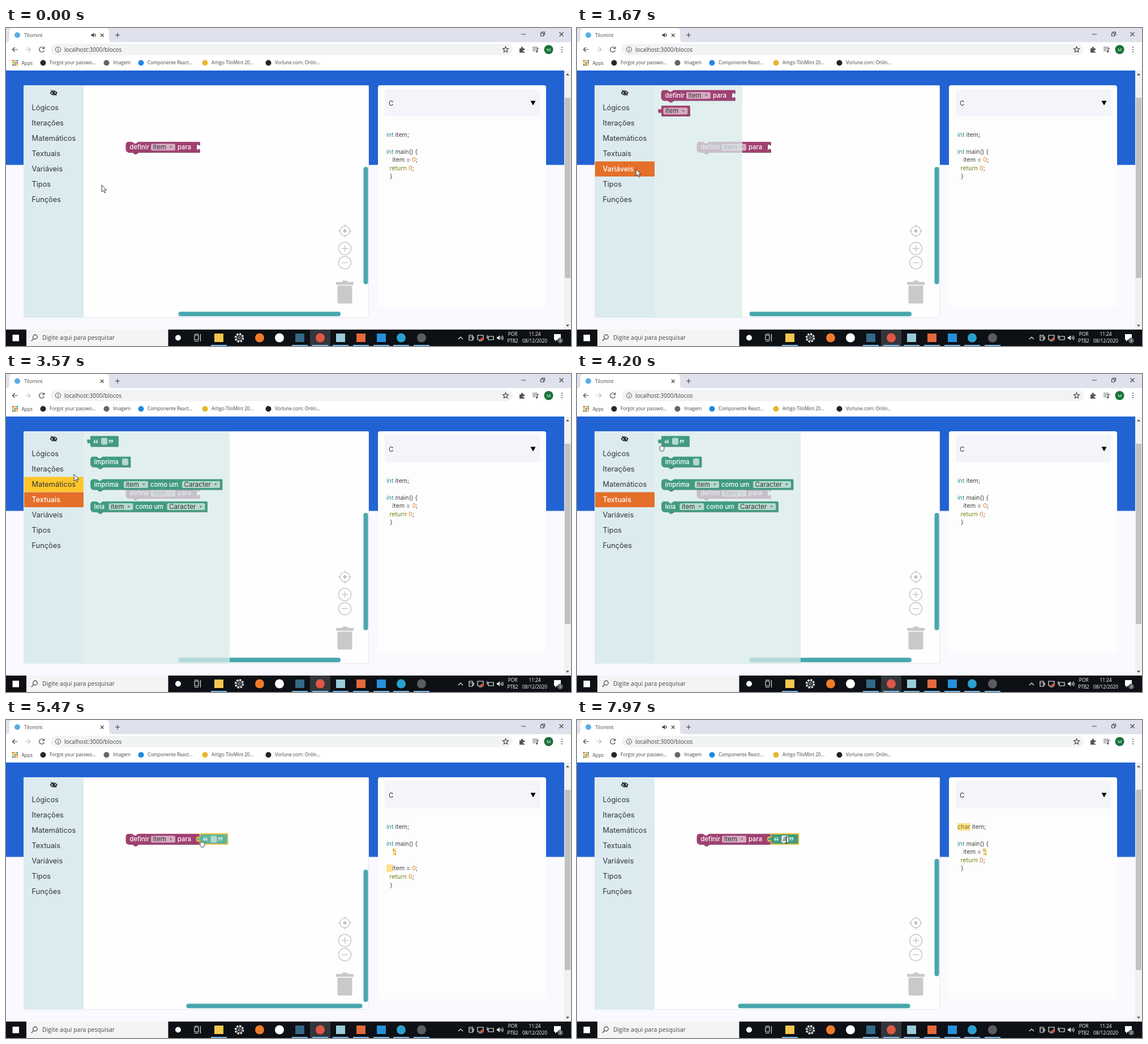
Write an HTML page that moves like this. It is 998 px wide and 561 px high and loops after 8 s.

```html
<!DOCTYPE html>
<html lang="pt-BR">
<head>
<meta charset="utf-8">
<title>Block editor</title>
<style>
html, body { margin: 0; width: 100%; height: 100%; overflow: hidden; background: #f9f9ff; }
svg { display: block; width: 998px; height: 561px; font-family: Inter, sans-serif; }
text { white-space: pre; }
.ui { font-family: "Open Sans", sans-serif; }
.quote { font-family: "Noto Serif", serif; font-weight: 700; }
.line { fill: none; stroke: #444; stroke-width: 1.2; }
</style>
</head>
<body>
<svg id="stage" viewBox="0 0 998 561"></svg>
<script>
const LOOP = 8000;
const PURPLE = '#9f4071', GREEN = '#419b80', TEAL = '#48a7ae', YELLOW = '#ffc62b';

// Markup helpers; text is placed by its vertical centre.
const rect = (x, y, w, h, fill, r = 0, more = '') =>
  `<rect x="${x}" y="${y}" width="${w}" height="${h}" rx="${r}" fill="${fill}" ${more}/>`;
const dot = (x, y, r, fill, more = '') => `<circle cx="${x}" cy="${y}" r="${r}" fill="${fill}" ${more}/>`;
const line = (d, more = '') => `<path class="line" d="${d}" ${more}/>`;
const shape = (d, fill, more = '') => `<path d="${d}" fill="${fill}" ${more}/>`;
const text = (x, y, s, size, fill = '#333', more = '') =>
  `<text x="${x}" y="${y + size * .36}" font-size="${size}" fill="${fill}" ${more}>${s}</text>`;
const ui = (x, y, s, size, fill = '#444', more = '') => text(x, y, s, size, fill, 'class="ui" ' + more);
const group = (id, body, more = '') => `<g id="${id}" ${more}>${body}</g>`;
const at = (x, y, body) => `<g transform="translate(${x} ${y})">${body}</g>`;

// Block parts
const NOTCH = 'l4.4,3 h2.2 l4.4,-3';
const TAB = 'V14.6 c0,-7.3 -5.8,1.8 -5.8,-5.5 s5.8,1.8 5.8,-5.5 Z';
const SOCKET = 'v3.6 c0,7.3 -5.8,-5.8 -5.8,5.5 s5.8,-1.8 5.8,5.5 V18.3';
const body = (d, fill, edge) =>
  shape(d, edge, 'transform="translate(.8 .8)"') + shape(d, fill) +
  `<path d="${d}" fill="none" stroke="#fff" stroke-opacity=".15" stroke-width=".6"/>`;
const statement = (w, fill, edge, socket) =>
  body(`M0,5 a5,5 0 0 1 5,-5 h6 ${NOTCH} H${w} ${socket ? SOCKET : 'V18.3'} H22 l-4.4,3 h-2.2 l-4.4,-3 H5 a5,5 0 0 1 -5,-5 Z`, fill, edge);
const valuePath = w => `M0,0 H${w} V18.3 H0 ${TAB}`;
const label = (x, s) => text(x, 9, s, 11.2, '#fff', 'font-weight="500"');
const field = (x, w, s, fill) => rect(x, 3.4, w, 12, fill, 2.5) + text(x + 3.5, 9, s, 11.6, '#333') +
  shape(`M${x + w - 10},8 h4.6 l-2.3,3 Z`, '#666');
const slot = x => rect(x, 3.4, 11, 12, '#b5d9cd', 3);
const quote = (x, s) => text(x, 13.5, s, 19, '#e9f6f1', 'class="quote"');
const quotes = () => quote(5, '“') + quote(31.5, '”');

const PINK = '#d6abc2', MINT = '#b5d9cd';
const setBlock = statement(130.5, PURPLE, '#762f54', true) +
  label(7, 'definir') + field(44.5, 43, 'item', PINK) + label(91.5, 'para');
const getBlock = body(valuePath(50), PURPLE, '#762f54') + field(3.5, 43, 'item', PINK);
const textBlock = body(valuePath(49), GREEN, '#2f735e') + quotes() + slot(19);
const printBlock = statement(70.5, GREEN, '#2f735e') + label(6.5, 'imprima') + slot(56);
const typedBlock = (verb, x, w) => statement(w, GREEN, '#2f735e') + label(6.5, verb) +
  field(x, 43, 'item', MINT) + label(x + 47, 'como um') + field(x + 103, 67, 'Caracter', MINT);

function browser() {
  const marks = [
    [77, 'Forgot your passwo...', '#24292e'], [189, 'Imagem', '#666'], [250, 'Componente React...', '#1e88e5'],
    [363, 'Artigo TiloMint 20...', '#e8b62c'], [475, 'Vorlune.com: Onlin...', '#222']
  ];
  const colors = ['#db4437', '#f4b400', '#0f9d58'];
  let s = rect(0, 0, 998, 75, '#fff') + rect(0, 0, 998, 25, '#dfe2ec') +
    shape('M0,25 Q6,25 6,19 V6 Q6,0 12,0 H176 Q182,0 182,6 V19 Q182,25 188,25 Z', '#fff') +
    dot(20, 12.5, 5, '#58aee6') + ui(32, 12.5, 'Tilomint', 8.5) +
    group('speaker', shape('M150.5,11 h2 l3,-2.5 v8 l-3,-2.5 h-2 Z', '#444') + line('M157,10 q2,2.5 0,5')) +
    line('M167,10 l5.5,5.5 M172.5,10 l-5.5,5.5') + line('M193,12.5 h8 M197,8.5 v8') +
    line('M910,11 h8 M944.5,9 h5 v5 h-5 Z M946.5,9 v-2 h5 v5 h-2 M977.5,7.5 l7,7 M984.5,7.5 l-7,7', 'stroke-width="1"') +
    line('M20.5,38 h-9 m4,-4 l-4,4 4,4') + line('M34,38 h9 m-4,-4 l4,4 -4,4', 'style="stroke:#bbb"') +
    line('M67,35.5 a4.5,4.5 0 1 0 .5,4 M67.5,33 v3.5 h-3.5') +
    rect(79, 28, 816, 20, '#f1f3f4', 10) + dot(92, 38, 4.6, 'none', 'stroke="#555"') +
    line('M92,37.5 v3 M92,35.2 v1') + ui(103, 38, 'localhost:3000/blocos', 10) +
    line('M882.5,33 l1.4,3.2 3.6,.3 -2.7,2.4 .8,3.6 -3.1,-1.9 -3.1,1.9 .8,-3.6 -2.7,-2.4 3.6,-.3 Z', 'stroke-width="1"') +
    shape('M907,36 h3 q-.5,-3 1.5,-3 t1.5,3 h3 v3 q-3,-.3 -3,1.3 t3,1.3 v2 h-9 Z', '#555') +
    line('M930,34 h9 M930,37 h9 M930,40 h5 M938.5,42 v-6 h3') + dot(937.5, 41.5, 1.7, '#555') +
    dot(958.5, 38, 8, '#187339') + ui(958.5, 38, 'M', 8, '#fff', 'text-anchor="middle"');
  for (let i = 0; i < 3; i++) s += dot(982, 34 + 4 * i, 1.1, '#555');
  for (let i = 0; i < 9; i++) s += rect(11 + 3.7 * (i % 3), 56.5 + 3.7 * (i / 3 | 0), 2.6, 2.6, colors[(i % 3 + (i / 3 | 0)) % 3]);
  s += ui(27.5, 61.5, 'Apps', 8.4);
  for (const [x, name, color] of marks) s += dot(x - 11.5, 61.5, 5, color) + ui(x, 61.5, name, 8.2);
  return s;
}

function page() {
  const rows = ['Lógicos', 'Iterações', 'Matemáticos', 'Textuais', 'Variáveis', 'Tipos', 'Funções'];
  const y = i => 140.5 + 27 * i;
  const controls = dot(598.5, 358, 8.5, 'none') + dot(598.5, 358, 3, '#c4c4c4', 'stroke="none"') +
    dot(598.5, 389, 11, 'none') + dot(598.5, 414, 11, 'none') +
    '<path d="M598.5,346.5 v4 M598.5,365.5 v4 M587,358 h4 M606,358 h4 M593,389 h11 M598.5,383.5 v11 M593,414 h11"/>';
  let s = rect(0, 75, 998, 457, '#f9f9ff') + rect(0, 75, 986, 166.5, '#2163d3') +
    rect(31.5, 101.5, 609, 409, '#fefefe', 1, 'stroke="#e6e6ec"') +
    at(211.5, 200.8, setBlock) +
    `<g stroke="#c8c8c8" stroke-width="1.5">${controls}</g>` +
    shape('M583,448 h10 l2,-2.5 h7 l2,2.5 h10 v5 h-31 Z M585.5,454.5 h26 v29 q0,2.5 -2.5,2.5 h-21 q-2.5,0 -2.5,-2.5 Z', '#c9c9c9') +
    rect(0, 0, 8, 1, TEAL, 4, 'id="vbar"') + rect(0, 500.5, 1, 8, TEAL, 4, 'id="hbar"');
  const flyout = (id, w, blocks) => group(id, rect(137, 101, w, 410, '#d7eaea', 0, 'opacity=".75"') + blocks);
  s += flyout('varFlyout', 155, at(148.5, 109.5, setBlock) + at(149, 137, getBlock)) +
    flyout('textFlyout', 258, at(149, 109.3, textBlock) + at(149, 145.7, printBlock) +
      at(149, 185.5, typedBlock('imprima', 59, 232.5)) + at(149, 224.7, typedBlock('leia', 32.5, 206)));
  s += rect(31.5, 101, 105.5, 410, '#dcebef') +
    line('M78.5,114.5 q5.7,-7 11.5,0 q-5.7,7 -11.5,0 Z M79.5,109.5 l9.5,9.5', 'style="stroke:#222;stroke-width:1.5"') + dot(84.3, 114.5, 2.3, '#222');
  rows.forEach((name, i) => {
    s += rect(32, y(i) - 13, 105, 26.5, YELLOW, 0, `id="hover${i}" opacity="0"`) + text(45.5, y(i), name, 12.8, '#30343a');
  });
  for (const [id, i] of [['varRow', 4], ['textRow', 3]])
    s += group(id, rect(32, y(i) - 13, 105, 26.5, '#e46f29') + text(45.5, y(i), rows[i], 12.6, '#fff', 'font-weight="500"'));
  s += rect(657, 101, 297, 392, '#fdfdfd', 4) + rect(669, 108, 274.5, 47.5, '#f4f4fa', 2) +
    text(676, 132.5, 'C', 11.5) + shape('M926.5,128.5 h9 l-4.5,8 Z', '#000') + code();
  s += rect(986, 75, 12, 457, '#f1f1f1') + rect(987, 123, 10, 318, '#c1c1c1') +
    shape('M989,83.5 l3,-3.5 3,3.5 Z M989,523.5 l3,3.5 3,-3.5 Z', '#505050');
  return s;
}

function code() {
  const span = (s, color) => `<tspan fill="${color}">${s}</tspan>`;
  const row = (n, x, s) => text(x, 188.5 + 14.6 * n, s, 10.7, '#444');
  const mark = (n, x, w) => rect(x, 182 + 14.6 * n, w, 13, '#ffe08c');
  const type = s => span(s, '#2b8995'), zero = span('0', '#df8020');
  const main = row(2, 672, type('int') + ' main() {');
  const end = n => row(n, 677.5, span('return ', '#76801a') + zero + ';') + row(n + 1, 678, '}');
  const decl = row(0, 672, type('int') + ' item;');
  return main +
    group('codeStart', decl + row(3, 682.5, `item = ${zero};`) + end(4)) +
    group('codeDrag', decl + mark(3, 683, 5.5) + row(3, 683, "';") + mark(5, 672, 11) + row(5, 682.5, `item = ${zero};`) + end(6)) +
    group('codeDrop', mark(0, 672, 22.5) + row(0, 672, span('char', '#76701a') + ' item;') +
      mark(3, 717.5, 5.8) + row(3, 682.5, "item = ';") + end(4));
}

function taskbar() {
  // Each app: x, colour, round, open
  const apps = [
    [376, '#f3c64f', 0, 1], [448, '#f07a2b', 1, 0], [483, '#fff', 1, 0], [519, '#346887', 0, 1],
    [555, '#df5746', 1, 1], [591, '#9bcbd8', 0, 1], [627, '#e36a3c', 0, 1], [663, '#2690db', 0, 1],
    [698, '#2aa0cf', 1, 1], [734, '#5b5c62', 1, 1]
  ];
  let s = rect(0, 532, 998, 29, '#0d1015') + rect(11.5, 541, 11.5, 11.5, '#fff') + rect(36, 532, 250.5, 29, '#f4f4f4') +
    dot(51.5, 545, 3.8, 'none', 'stroke="#333" stroke-width="1.2"') + line('M48.8,548 l-4,4') +
    ui(64, 546.5, 'Digite aqui para pesquisar', 10.5) + dot(304, 546.5, 5, '#fff') +
    line('M333,542 h7 v8 h-7 Z M333,540 h7 M333,552.5 h7 M343.5,540 v13', 'style="stroke:#ddd"') +
    dot(412, 546.5, 7, 'none', 'stroke="#eee" stroke-width="2.4" stroke-dasharray="3.5 2"') +
    dot(412, 546.5, 5, 'none', 'stroke="#eee"') + dot(412, 546.5, 2, 'none', 'stroke="#eee"') +
    rect(537, 532, 36, 29, '#33363b');
  for (const [x, color, round, open] of apps) {
    s += round ? dot(x, 546.5, 8, color) : rect(x - 8, 539, 16, 15, color);
    if (open) s += rect(x - 14, 559, 28, 2, '#76b9ed');
  }
  const white = 'style="stroke:#eee"', mid = 'text-anchor="middle"';
  s += line('M799,549 l4,-4 4,4', white) + line('M818,542 h6 v9 h-6 Z M819.5,545 h3 M824,545 h2 v4 h-2', white) +
    line('M833,542 h10 v8 h-10 Z M835,552 h6', white) + dot(841, 549, 2.8, '#dd4c38') +
    line('M852,544 h9 v6 h-9 Z M850,542 v6', white) +
    shape('M867,545 h2 l3,-3 v9 l-3,-3 h-2 Z', '#eee') + line('M874,544 q2,2.5 0,5 M876.5,542.5 q3,4 0,8', white) +
    ui(895, 540, 'POR', 8.3, '#fff', mid) + ui(895, 552.5, 'PTB2', 8.3, '#fff', mid) +
    ui(934, 540, '11:24', 8.3, '#fff', mid) + ui(934, 552.5, '08/12/2020', 8.3, '#fff', mid) +
    shape('M968,540 h12 v10 h-7 l-3,3 v-3 h-2 Z', '#fff') + dot(979, 551.5, 5, '#555a60') +
    ui(979, 551.5, '3', 7.5, '#fff', mid);
  return s;
}

function dragged() {
  const path = valuePath(49);
  return group('dragged',
    group('lifted', shape(path, '#5eb49d') + quotes() + slot(19)) +
    group('placed', shape(path, GREEN) + quotes() + slot(19)) +
    `<path d="${path}" fill="none" stroke="#f7c331" stroke-width="1.8"/>` +
    group('editor', rect(19, 3.2, 11.5, 12.4, '#fff', 2.5)) +
    group('typed', text(20.5, 9, 'a', 11.5, '#333')));
}

const pointers = () => group('pointer',
  group('arrow', shape('M0,0 V12 L2.8,9.5 4.8,13.8 6.7,13 4.8,8.8 H8.5 Z', '#fff', 'stroke="#222" stroke-width=".9"')) +
  group('hand', shape('M-4,1 q-1,-3 1,-3 q1,-2.5 2.5,-1 q1.5,-1.5 2.5,.2 q2.5,-.6 2,2.3 l-.5,3 q-.5,2 -1.5,3 h-4 q-2,-2.5 -2,-4.5 Z', '#fff', 'stroke="#222" stroke-width=".9"')) +
  group('beam', line('M-2.5,-5.5 h5 M0,-5.5 v11 M-2.5,5.5 h5', 'style="stroke:#111"')));

const $ = id => document.getElementById(id);
$('stage').innerHTML = browser() + page() + dragged() + taskbar() + pointers();

const play = (id, frames) => $(id).animate(frames, { duration: LOOP, iterations: Infinity });

// Shows an element only inside the given [from, to] spans.
function show(id, ...spans) {
  const frames = spans[0][0] > 0 ? [{ offset: 0, opacity: 0 }] : [];
  for (const [from, to] of spans) {
    frames.push({ offset: from / LOOP, opacity: 1 });
    frames.push({ offset: to / LOOP, opacity: to < LOOP ? 0 : 1 });
  }
  if (frames.at(-1).offset < 1) frames.push({ offset: 1, opacity: 0 });
  play(id, frames.map(f => ({ ...f, easing: 'step-end' })));
}
const move = (id, steps) => play(id, steps.map(([t, x, y]) =>
  ({ offset: t / LOOP, transform: `translate(${x}px, ${y}px)` })));

const OPEN_VARS = 1300, OPEN_TEXT = 2800, GRAB = 4600, DROP = 5550, EDIT = 6150, TYPE = 7250;

show('speaker', [0, 2480], [6200, LOOP]);
show('hover4', [520, 2250]);
show('hover3', [2250, 3250]);
show('hover2', [3250, 3610]);
show('hover1', [3610, 3790]);
show('varRow', [OPEN_VARS, OPEN_TEXT]);
show('varFlyout', [OPEN_VARS, OPEN_TEXT]);
show('textRow', [OPEN_TEXT, GRAB]);
show('textFlyout', [OPEN_TEXT, GRAB]);
show('codeStart', [0, GRAB]);
show('codeDrag', [GRAB, DROP]);
show('codeDrop', [DROP, LOOP]);
show('dragged', [GRAB, LOOP]);
show('lifted', [GRAB, DROP]);
show('placed', [DROP, LOOP]);
show('editor', [EDIT, LOOP]);
show('typed', [TYPE, LOOP]);
show('arrow', [0, 4150]);
show('hand', [4150, 5800]);
show('beam', [5800, LOOP]);

// Scrollbars: time, vertical top and length, horizontal left and length
const bars = [[0, 245, 207, 304.5, 286.5], [GRAB, 264, 233.5, 318.5, 311], [DROP, 245, 207, 284.5, 304], [LOOP, 245, 207, 284.5, 304]];
const held = (t, x, y, size) => ({ offset: t / LOOP, transform: `translate(${x}px, ${y}px)`, easing: 'step-end', ...size });
play('vbar', bars.map(([t, y, h]) => held(t, 631.5, y, { height: h + 'px' })));
play('hbar', bars.map(([t, , , x, w]) => held(t, x, 0, { width: w + 'px' })));

move('dragged', [[0, 149, 109.3], [4700, 149, 109.3], [5000, 238, 150], [5350, 342.5, 200.8], [LOOP, 342.5, 200.8]]);
move('pointer', [
  [0, 169, 277], [250, 169, 277], [600, 128, 260], [1030, 111, 252], [1700, 104, 249], [2100, 99, 241],
  [2370, 97, 231], [2750, 96, 223], [3100, 101, 219], [3400, 112, 195], [3570, 120, 177], [3900, 141, 141],
  [4300, 153, 127], [4700, 153, 127], [5000, 242, 168], [5350, 346.5, 218.5], [5600, 347, 219],
  [5950, 369, 214], [6470, 371, 214], [7500, 370, 211.5], [LOOP, 370, 211.5]
]);
</script>
</body>
</html>
```
